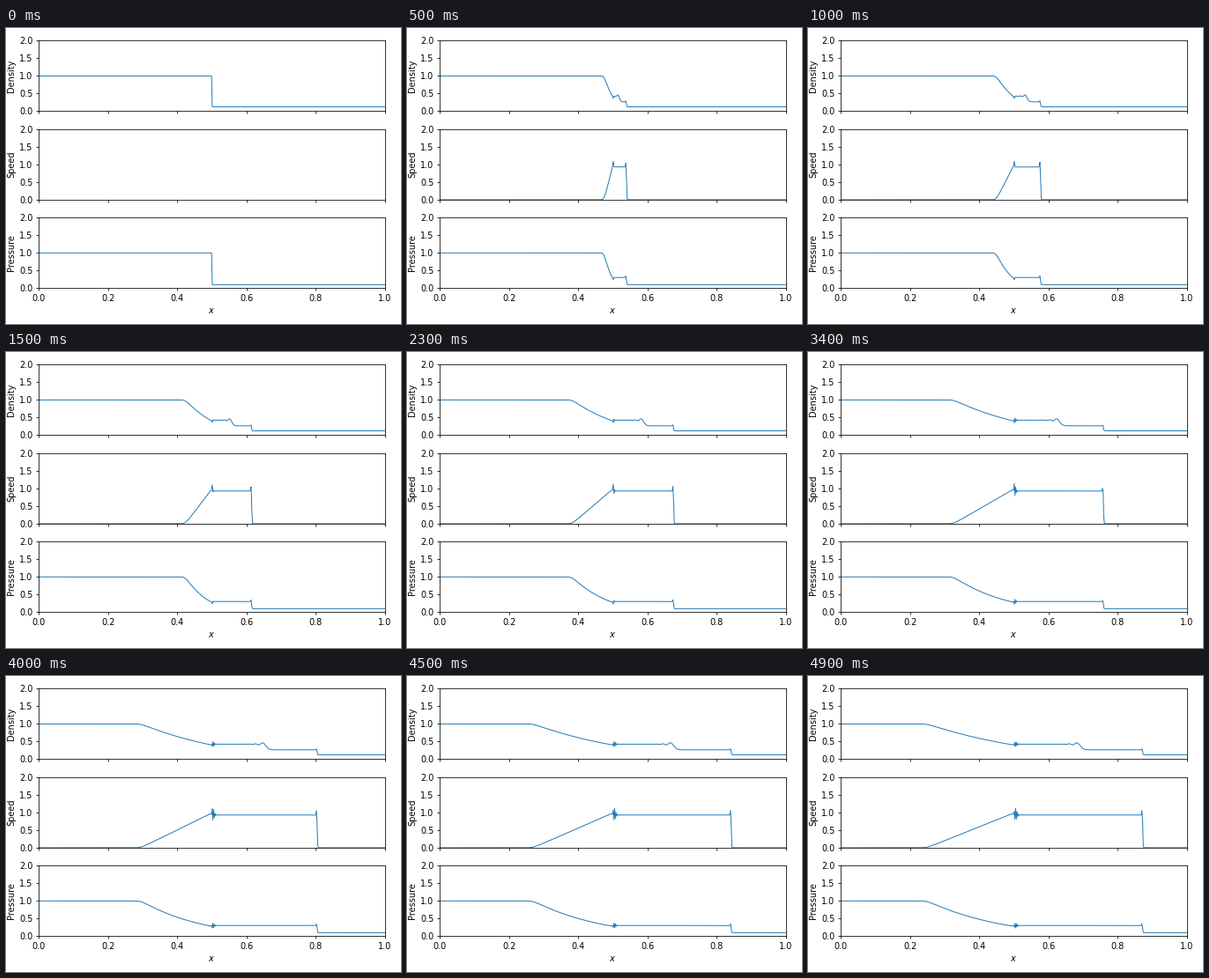
A matplotlib script for the animation above (5 s loop, 448 by 336 pixels).

```python
import numpy as np
import matplotlib.pyplot as plt
from matplotlib.animation import FuncAnimation

WIDTH, HEIGHT, DPI = 448, 336, 70
FRAMES, INTERVAL = 50, 100
GAMMA = 1.4
CELLS = 500
STEPS_PER_FRAME = 5
END_TIME = 0.2126

x = np.linspace(0, 1, CELLS)
dx = x[1] - x[0]


def primitives(state):
    density, momentum, energy = state
    speed = momentum / density
    pressure = (GAMMA - 1) * (energy - 0.5 * momentum * speed)
    return density, speed, pressure


def flux(state):
    _, speed, pressure = primitives(state)
    _, momentum, energy = state
    return np.array([momentum,
                     momentum * speed + pressure,
                     speed * (energy + pressure)])


def fastest_wave(state):
    density, speed, pressure = primitives(state)
    return np.max(np.abs(speed) + np.sqrt(GAMMA * pressure / density))


def advance(state, dt):
    """One two-step Lax-Wendroff update with fixed ends."""
    ratio = dt / dx
    f = flux(state)
    half = 0.5 * (state[:, 1:] + state[:, :-1]) - 0.5 * ratio * np.diff(f, axis=1)
    new = state.copy()
    new[:, 1:-1] -= ratio * np.diff(flux(half), axis=1)
    return new


def solve(courant):
    left = x < 0.5
    density = np.where(left, 1.0, 0.125)
    pressure = np.where(left, 1.0, 0.1)
    state = np.array([density, np.zeros(CELLS), pressure / (GAMMA - 1)])
    history, time = [primitives(state)], 0.0
    for _ in range(FRAMES - 1):
        for _ in range(STEPS_PER_FRAME):
            dt = courant * dx / fastest_wave(state)
            state = advance(state, dt)
            time += dt
        history.append(primitives(state))
    return history, time


# Scale the Courant number so that the last frame falls on END_TIME.
courant = 0.95
for _ in range(4):
    history, time = solve(courant)
    courant *= END_TIME / time

plt.rcParams["font.family"] = "DejaVu Sans"
fig = plt.figure(figsize=(WIDTH / DPI, HEIGHT / DPI), dpi=DPI, facecolor="white")

LEFT, RIGHT = 37.2, 429.9
TOP, PANEL, PITCH = 14.35, 80.1, 100.45
lines = []
for row, name in enumerate(["Density", "Speed", "Pressure"]):
    bottom = HEIGHT - (TOP + row * PITCH + PANEL)
    ax = fig.add_axes([LEFT / WIDTH, bottom / HEIGHT,
                       (RIGHT - LEFT) / WIDTH, PANEL / HEIGHT])
    ax.set(xlim=(0, 1), ylim=(0, 2), ylabel=name)
    ax.set_xticks(np.linspace(0, 1, 6))
    ax.set_yticks(np.linspace(0, 2, 5))
    ax.tick_params(labelbottom=row == 2)
    lines += ax.plot(x, history[0][row], color="C0", lw=1)
ax.set_xlabel("$x$")


def update(frame):
    for line, values in zip(lines, history[frame]):
        line.set_ydata(values)
    return lines


anim = FuncAnimation(fig, update, frames=FRAMES, interval=INTERVAL,
                     repeat=True, repeat_delay=0, blit=False)
plt.show()
```
